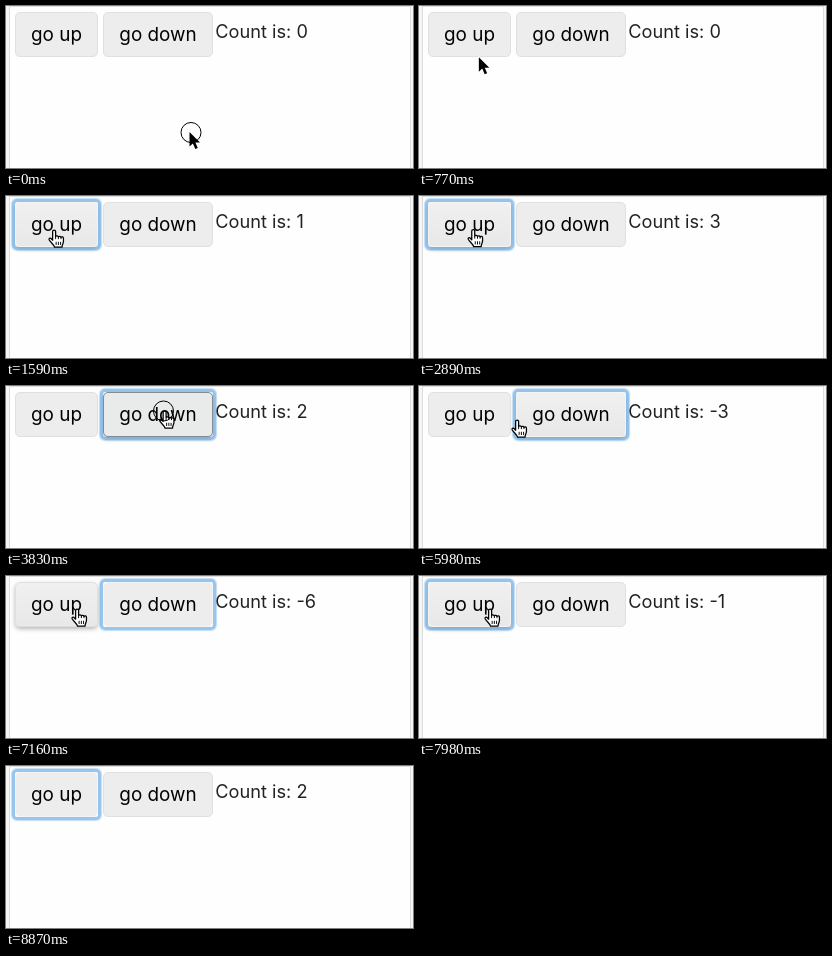
Recreate the animation shown at these times as an HTML page. Size 407 by 162 pixels, loop 9530 ms.

```html
<!DOCTYPE html>
<html lang="en">
<head>
<meta charset="utf-8">
<title>Counter</title>
<style>
  html, body { margin: 0; width: 100%; height: 100%; overflow: hidden; background: #f5f5f5; }
  body { position: relative; }
  .panel {
    position: absolute; inset: 0 2px 0 3px;
    background: #fefefe; border: 1px solid #dcdcdc; border-bottom: 0;
  }
  .btn, .count {
    position: absolute; box-sizing: border-box; white-space: pre;
    font-family: Inter, "Open Sans", sans-serif;
  }
  .btn {
    top: 6px; height: 45px; line-height: 44px; text-align: center;
    font-size: 18.9px; color: #000; background: #ededed;
    border: 1px solid #e0e0e0; border-radius: 5px;
  }
  .up { left: 9px; width: 83px; }
  .down { left: 97px; width: 110px; }
  .count { left: 209.3px; top: 3px; line-height: 45px; font-size: 18.2px; color: #222; }
  .btn.hover {
    background: linear-gradient(#f0f0f0, #e8e8e8);
    box-shadow: 0 2px 4px rgba(0, 0, 0, .28);
  }
  .btn.focus { border-color: #f4f4f4; }
  .btn.focus::after {
    content: ""; position: absolute; inset: -4px;
    border: 3px solid rgba(84, 160, 228, .6); border-radius: 5px;
    box-shadow: 0 0 1px 1px rgba(84, 160, 228, .35);
  }
  .btn.active { background: #e9ebea; border-color: #858a8e; }
  svg { position: absolute; left: 0; top: 0; width: 100%; height: 100%; }
</style>
</head>
<body>
<div class="panel"></div>
<div class="btn up">go up</div>
<div class="btn down">go down</div>
<div class="count">Count is: 0</div>
<svg>
  <g id="cursor">
    <path id="arrow" transform="translate(-1.5 -.5)" fill="#000" stroke="#fff" paint-order="stroke" stroke-width="1.6"
      d="M0 0V14.5L3.4 11.4 5.8 17 8.3 16 5.9 10.5H10.5Z"/>
    <g id="hand" transform="translate(-4.6 -.4) scale(1.06)" stroke="#000" stroke-width="1.2" stroke-linejoin="round">
      <path fill="#fff" d="M4 10V1.8a1.4 1.4 0 0 1 2.8 0V6.5a1.4 1.2 0 0 1 2.6 .3a1.4 1.2 0 0 1 2.5 .5a1.3 1.2 0 0 1 2.3 .8V11c0 2-1.2 3-1.4 5.5H5.8C5.5 14.5 2.5 12.5 .8 9.8C0 8.3 1.8 7.6 2.7 8.6Z"/>
      <path fill="none" stroke-width=".9" d="M6.8 6.5V9M9.4 6.8V9M11.9 7.3V9M7.3 11.5V14.5M9.4 11.5V14.5M11.5 11.5V14.5"/>
    </g>
    <circle id="ring" r="10" fill="none" stroke="#000"/>
  </g>
</svg>
<script>
  const LOOP = 9530, UP = 0, DOWN = 1;
  const $ = s => document.querySelector(s);
  const buttons = [$('.up'), $('.down')];
  const spans = [[9, 92], [97, 207]];
  const start = [185, 126.5];
  const smooth = p => p * p * (3 - 2 * p);

  // begin, end, steps, x, y
  const moves = [
    [300, 880, 10, 47, 43],
    [1120, 1180, 2, 47, 34],
    [2840, 3180, 7, 157.5, 25],
    [5980, 6040, 1, 97, 34],
    [6040, 6200, 4, 70, 33],
    [8690, 8830, 4, 80, 97]
  ];
  // press, release, button
  const clicks = [
    [1470, 1530, UP], [2010, 2130, UP], [2430, 2480, UP],
    [3480, 3540, DOWN], [3830, 3890, DOWN], [4130, 4190, DOWN],
    [4840, 4900, DOWN], [5200, 5260, DOWN], [5500, 5560, DOWN]
  ];
  const keys = [
    [6560, 6620, DOWN], [6790, 6850, DOWN], [7040, 7160, DOWN],
    [7400, 7510, UP], [7570, 7630, UP], [7690, 7750, UP], [7810, 7860, UP],
    [7920, 7980, UP], [8040, 8100, UP], [8160, 8270, UP], [8630, 8690, UP]
  ];
  const presses = [...clicks, ...keys];
  const focuses = [[1470, UP], [3480, DOWN], [7280, UP]];

  function pointer(t) {
    let [x, y] = start;
    for (const [a, b, n, tx, ty] of moves) {
      if (t < a) break;
      const k = Math.min(n, Math.floor((t - a) / (b - a) * (n - 1) + 1e-6) + 1);
      const p = smooth(k / n);
      x += (tx - x) * p;
      y += (ty - y) * p;
    }
    return [x, y];
  }

  const held = list => t => list.find(([a, b]) => t >= a && t < b);
  const pressed = held(presses), clicked = held(clicks);
  const show = (el, on) => el.setAttribute('visibility', on ? 'visible' : 'hidden');

  function draw(t) {
    const [x, y] = pointer(t);
    const visible = t < 8870;
    const over = visible && y > 6 && y < 51
      ? spans.findIndex(([l, r]) => x >= l && x <= r) : -1;
    const press = pressed(t);
    let focus = -1, count = 0;
    for (const [at, b] of focuses) if (t >= at) focus = b;
    for (const [, up, b] of presses) if (t >= up) count += b === UP ? 1 : -1;

    buttons.forEach((el, i) => {
      el.classList.toggle('hover', over === i);
      el.classList.toggle('focus', focus === i);
      el.classList.toggle('active', !!press && press[2] === i);
    });
    $('.count').textContent = 'Count is: ' + count;
    $('#cursor').setAttribute('transform', `translate(${x} ${y})`);
    show($('#hand'), visible && over >= 0);
    show($('#arrow'), visible && over < 0);
    show($('#ring'), t < 60 || clicked(t));
  }

  const t0 = performance.now();
  function tick(now) {
    draw(Math.max(0, now - t0) % LOOP);
    requestAnimationFrame(tick);
  }
  draw(0);
  requestAnimationFrame(tick);
</script>
</body>
</html>
```
